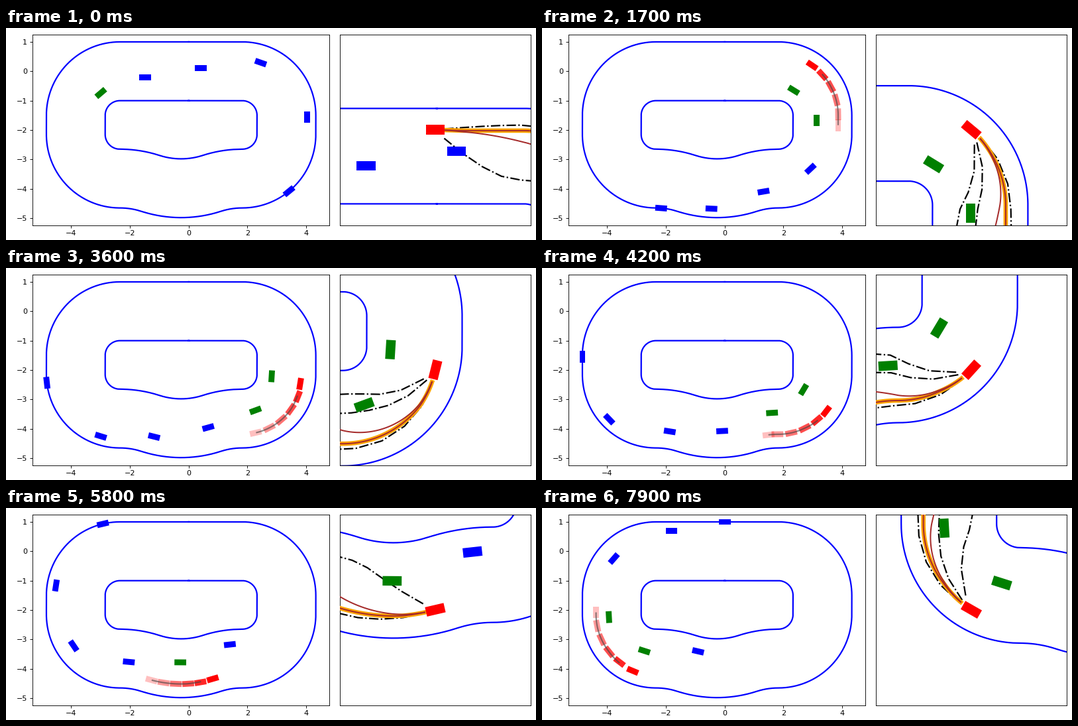
Recreate the animation shown at these times as a matplotlib script. Size 800 by 320 pixels, loop 8 s.

```python
import numpy as np
import matplotlib.pyplot as plt
from matplotlib.animation import FuncAnimation
from matplotlib.patches import Polygon

FRAMES, STEP = 80, 100
VIEW = 2.0                            # half width of the follow view
MID = 1.5                             # corner radius of the centre line
BEND, SWAY = 17.95, 3.38              # angle and radius of the dip at the bottom
LANES = 1.0 + .3 * np.arange(6)       # one car per lane
CRUISE = 2.035                        # lane that the plan follows
START, HORIZON = .2, 1.65             # reach of the plan ahead of the ego car

# The ego car: time, distance along the centre line, lane
KEY_T = np.array([0, 1.7, 3.6, 4.9, 5.8, 6.9, 7.9])
KEY_S = np.array([-.04, 2.872, 5.204, 6.91, 8.539, 10.276, 12.208])
KEY_R = np.array([2.053, 2.052, 1.997, 2.127, 2.006, 2.067, 2.074])


def build_track():
    """Integrate the centre line from (length, turn) pieces, clockwise from the top."""
    quarter, wave = MID * np.pi / 2, SWAY * np.radians(BEND)
    pieces = [(1.83, 0), (quarter, -90), (.65, 0), (quarter, -90),
              (wave, BEND), (2 * wave, -2 * BEND), (wave, BEND),
              (quarter, -90), (.65, 0), (quarter, -90), (2.35, 0)]
    length, turn = np.array(pieces).T
    ends = np.append(0, np.cumsum(length))
    s = np.linspace(0, ends[-1], 8001)
    heading = np.interp(s, ends, np.radians(np.append(0, np.cumsum(turn))))
    half = (heading[1:] + heading[:-1]) / 2
    x = np.append(0, np.cumsum(np.cos(half))) * s[1]
    y = np.append(0, np.cumsum(np.sin(half))) * s[1]
    return s, x, y, heading


TRACK_S, TRACK_X, TRACK_Y, TRACK_H = build_track()
LENGTH = TRACK_S[-1]


def heading(s):
    return np.interp(np.mod(s, LENGTH), TRACK_S, TRACK_H)


def lane(s, r):
    """Point at distance s along the centre line, in the lane with corner radius r."""
    u = np.where(np.asarray(s) == LENGTH, LENGTH, np.mod(s, LENGTH))
    h = np.interp(u, TRACK_S, TRACK_H)
    x = np.interp(u, TRACK_S, TRACK_X) - np.sin(h) * (r - MID)
    y = np.interp(u, TRACK_S, TRACK_Y) + np.cos(h) * (r - MID)
    return np.stack([x, y], axis=-1)


def spline(t, values):
    slope = np.gradient(values, KEY_T)
    i = np.clip(np.searchsorted(KEY_T, t, side="right") - 1, 0, len(KEY_T) - 2)
    h = KEY_T[i + 1] - KEY_T[i]
    u = (t - KEY_T[i]) / h
    return ((1 + 2 * u) * (1 - u) ** 2 * values[i] + u * (1 - u) ** 2 * h * slope[i]
            + u * u * (3 - 2 * u) * values[i + 1] + u * u * (u - 1) * h * slope[i + 1])


def ego_at(t):
    return spline(t, KEY_S), spline(t, KEY_R)


def cars_at(k):
    """Distances of all cars; they wait on a grid until the first step."""
    i, t = np.arange(len(LANES)), k * STEP / 1000
    if k == 0:
        return -3.41 + i * LENGTH / 10
    return .62 + 1.197 * t + i * (1.674 + .0175 * t)


def box(s, r):
    h = heading(s)
    along, across = np.array([np.cos(h), np.sin(h)]), np.array([-np.sin(h), np.cos(h)])
    return [lane(s, r) + a * along + b * across
            for a, b in ((-.2, -.1), (.2, -.1), (.2, .1), (-.2, .1))]


def swerve(s, r, target):
    """Ease out from lane r to the target lane, drawn in a few straight legs."""
    d = np.linspace(START, 2.2, 6)
    u = np.clip(d / 1.7, 0, 1)
    return lane(s + d, r + (target - r) * (1 - (1 - u) ** 1.5))


fig = plt.figure(figsize=(10, 4), dpi=80)
world = fig.add_axes([.05, .07, .56, .9])
view = fig.add_axes([.63, .07, .36, .9])
world.set(xlim=(-5.309, 4.789), ylim=(-5.236, 1.256))
view.set(xticks=[], yticks=[])
for ax in (world, view):
    for wall in (.5, 2.5):
        ax.plot(*lane(np.linspace(0, LENGTH, 800), wall).T, color="blue", lw=2, zorder=1)


def add_box(ax, color, z, alpha=1):
    return ax.add_patch(Polygon(np.zeros((4, 2)), fc=color, ec="none", alpha=alpha, zorder=z))


def add_line(ax, z, **style):
    return ax.plot([], [], zorder=z, **style)[0]


world_cars = [add_box(world, "blue", 3) for _ in LANES]
view_cars = [add_box(view, "blue", 6) for _ in LANES]
trail = [add_box(world, "red", 4, a) for a in np.linspace(.25, 1, 6)][::-1]
trail_line = add_line(world, 5, color="#404040", alpha=.6, lw=2)
ego_box = add_box(view, "red", 7)
options = [add_line(view, 3, color="black", lw=2, ls="-.") for _ in range(3)]
plan_line = add_line(view, 4, color="orange", lw=6)
brown = [add_line(view, 5, color="brown", lw=1.8) for _ in range(2)]


def draw(k):
    t = k * STEP / 1000
    s, r = ego_at(t)

    cars = cars_at(k)
    ahead = cars - s
    near = (ahead > -.37) & (ahead < 1.9) if k else LANES == LANES[0]
    for i, flag in enumerate(near):
        for patch in (world_cars[i], view_cars[i]):
            patch.set_xy(box(cars[i], LANES[i]))
            patch.set_facecolor("green" if flag else "blue")

    # Plan: settle into the cruise lane, with a second guess drifting inwards
    d = np.linspace(START, 2.2, 60)
    path = r + (CRUISE - r) * np.clip(d / .6, 0, 1)
    plan = lane(s + d, path)
    plan_line.set_data(*plan.T)
    brown[0].set_data(*plan.T)
    brown[1].set_data(*lane(s + d, path - .19 * (d / HORIZON) ** 2).T)

    # Ways around the near cars: outside, inside, and between two of them
    targets = [2.15, 1.0, LANES[near].max(initial=0) + .1]
    for line, target in zip(options, targets):
        line.set_data(*swerve(s, r, target).T)
    options[2].set_visible(near.sum() > 1)

    ego_box.set_xy(box(s, r))
    x, y = lane(s, r)
    view.set_xlim(x - VIEW, x + VIEW)
    view.set_ylim(y - VIEW, y + VIEW)

    # The overview shows the ego car one step late, then its plan
    spots = s + np.linspace(START, HORIZON, 5)
    trail[0].set_xy(box(*ego_at(max(t - STEP / 1000, 0))))
    for patch, spot in zip(trail[1:], spots):
        patch.set_xy(box(spot, CRUISE))
    trail_line.set_data(*plan[d <= HORIZON].T)
    for artist in (*trail, trail_line):
        artist.set_visible(k > 0)
    return []


anim = FuncAnimation(fig, draw, frames=FRAMES, interval=STEP, repeat=True, repeat_delay=0)
plt.show()
```
